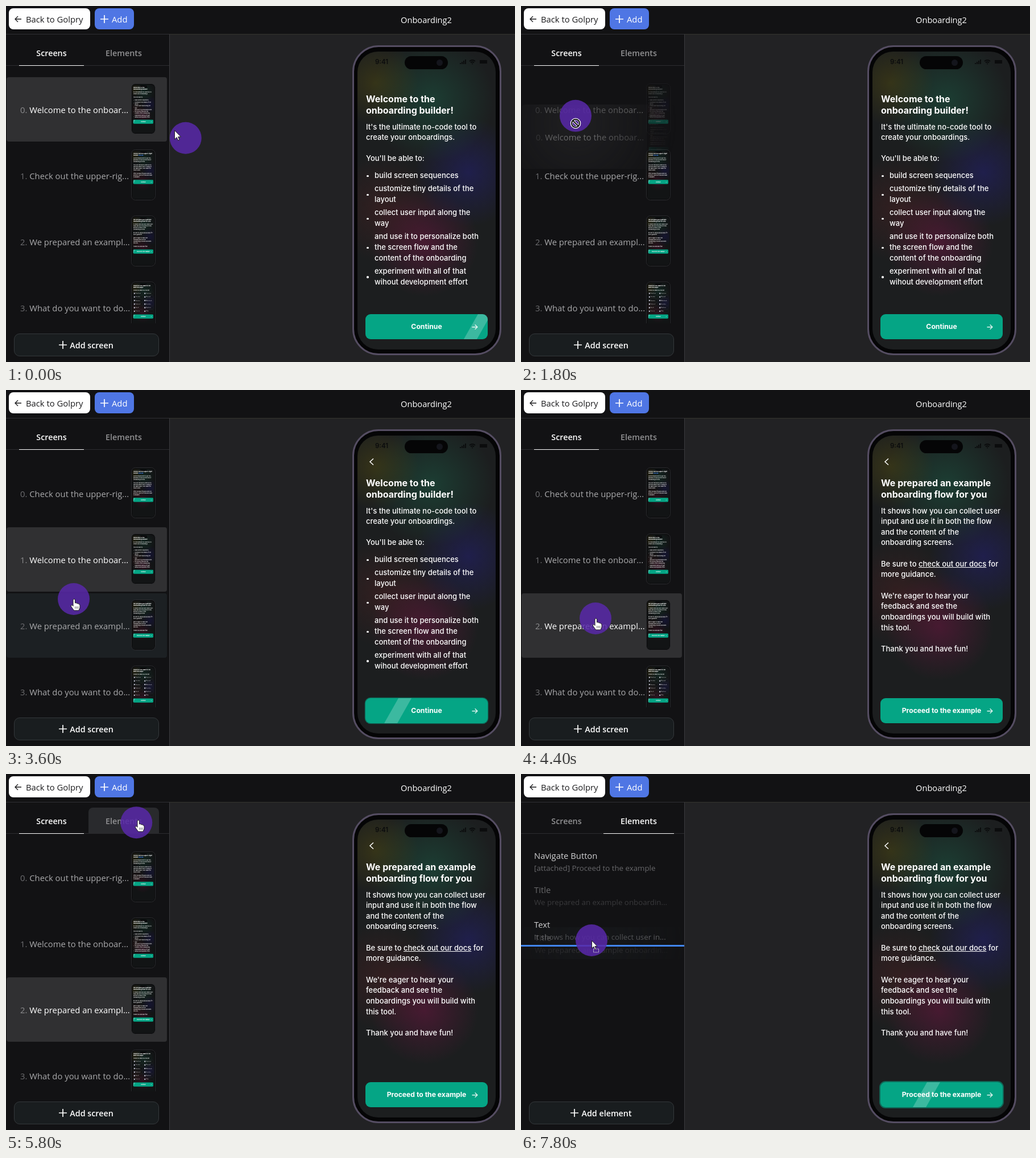
Recreate the animation shown at these times as an HTML page. Size 895 px wide and 625 px high, loop 8000 ms.

```html
<!DOCTYPE html>
<html lang="en">
<head>
<meta charset="utf-8">
<title>Onboarding builder</title>
<style>
html, body { margin: 0; width: 100%; height: 100%; overflow: hidden; background: #121214; }
#stage { position: relative; width: 895px; height: 625px; overflow: hidden; background: #121214;
  font: 14.8px/20px "Open Sans", "Noto Sans", sans-serif; color: #fff; white-space: pre; }
#stage div, #stage svg { position: absolute; box-sizing: border-box; }
svg { overflow: visible; fill: none; stroke: currentColor; }
#canvas { left: 287px; top: 49px; width: 608px; height: 576px; background: #222224;
  border-left: 1px solid #3a3a3d; border-top: 1px solid #34342f; }
#header { left: 0; top: 49px; width: 287px; height: 1px; background: #303033; }
.btn { height: 37px; top: 4px; border-radius: 8px; line-height: 38px; }
#back { left: 5px; width: 143px; background: #fff; color: #1b1b1d; padding-left: 30px; }
#add { left: 156px; width: 69px; background: #4f76e4; padding-left: 30px; }
#name { left: 639px; width: 200px; top: 14px; text-align: center; font-size: 14.6px; }
.tab { top: 59px; height: 46px; line-height: 47px; text-align: center; font-weight: 600; font-size: 14.3px;
  color: #919193; border-radius: 8px 8px 0 0; }
.tab.hover { background: #292a2d; }
.tab.on { color: #fff; border-bottom: 1px solid #fff; border-radius: 0; }
#tabline { left: 0; top: 104px; width: 287px; height: 1px; background: #2d2d30; }
#list { left: 0; top: 0; width: 287px; height: 557px; overflow: hidden; }
#elements { left: 0; top: 0; }
.row { left: 1px; width: 282px; height: 113px; border-radius: 4px; color: #a9a9ab; }
.row .label { left: 24px; top: 47px; }
.row i { font-style: normal; color: #6d6d70; }
.hover { background: #1c2023; }
.row.sel { background: #303032; color: #fff; }
.row.sel i { color: #8c8c8e; }
.row.drag { background: none; opacity: .35; }
.item { left: 1px; width: 281px; height: 56px; border-radius: 4px; color: #d0d0d2; }
.item div { left: 22px; top: 8px; }
.item .sub { top: 30px; font-size: 13.3px; color: #67676a; }
.item.drag { background: none; opacity: .45; }
#bottom { left: 14px; top: 575px; width: 255px; height: 40px; border-radius: 10px; background: #191d1f;
  border: 1px solid #34383b; text-align: center; font-weight: 600; font-size: 14.3px; line-height: 40px; padding-left: 18px; }
#drop { left: 0; width: 287px; height: 3px; background: #4286f5; }
#ghost { left: 0; top: 0; }
#halo { left: -28px; top: -28px; width: 56px; height: 56px; border-radius: 50%; background: rgba(88,40,168,.86); }

.phone { left: 609px; top: 69px; width: 262px; height: 544px; border-radius: 46px; background: #050506;
  border: 3px solid #554d62; font: 500 13px/18.65px Inter, "Noto Sans", sans-serif; color: #fff; }
.phone .glass { left: 6px; top: 8px; width: 243px; height: 523px; border-radius: 36px; overflow: hidden; background:
  radial-gradient(circle 75px at 32px 55px, rgba(88,80,14,.42), transparent),
  radial-gradient(circle 110px at 130px 85px, rgba(28,98,74,.46), transparent),
  radial-gradient(circle 95px at 195px 212px, rgba(36,32,130,.45), transparent),
  radial-gradient(circle 95px at 118px 335px, rgba(130,20,74,.42), transparent),
  radial-gradient(circle 95px at 45px 275px, rgba(84,32,34,.4), transparent), #1c1e1f; }
.island { left: 89px; top: 16px; width: 76px; height: 23px; border-radius: 12px; background: #050506; }
.lens { right: 9px; top: 6px; width: 11px; height: 11px; border-radius: 50%; background: #14151c; }
.clock { left: 37px; top: 17px; color: #0b0c0d; font-weight: 600; font-size: 11.5px; }
.status { left: 186px; top: 21px; color: #0b0c0d; }
.content { left: 21px; top: 81px; width: 216px; }
#stage .content > div, #stage .grid { position: relative; }
.content .title { font-weight: 700; font-size: 16px; line-height: 20px; margin-bottom: 9.5px; }
.content ul { margin: 1px 0 -4.7px; padding: 10px 0 0; list-style: none; }
.content li { position: relative; padding-left: 15px; margin-bottom: 4.7px; }
.content li::before { content: ""; position: absolute; left: 1px; top: calc(50% - .5px); width: 3.5px; height: 3.5px; border-radius: 50%; background: #fff; }
.grid { display: grid; grid-template-columns: 1fr 1fr; gap: 7px 8px; height: 222px; margin-top: 9px; }
.grid span { border: 1px solid #44474a; border-radius: 8px; padding: 5px 4px 0 24px; font-size: 10px; position: relative; overflow: hidden; }
.grid span::before { content: ""; position: absolute; left: 4px; top: 8px; width: 14px; height: 14px; border-radius: 50%; background: #dde; }
.content b { color: #3c7df0; }
#cta { left: 20px; top: 469px; }
.cta { left: 0; top: 0; width: 215px; height: 44px; border-radius: 9px; background: #05a585;
  text-align: center; line-height: 43px; font-weight: 700; font-size: 12.2px; overflow: hidden; }
.cta .arrow { right: 16px; top: 0; font-weight: 500; font-size: 14px; }
.cta .shine { top: 0; left: -24px; width: 48px; height: 44px; background: rgba(255,255,255,.22);
  clip-path: polygon(52% 0, 100% 0, 48% 100%, 0 100%); }
#stage .thumb { left: 219px; top: 11px; transform: scale(.1636); transform-origin: 0 0; border-color: #2f3033; border-width: 6px; }
.thumb .glass { left: 3px; top: 6px; opacity: .6; }
.thumb .content { left: 18px; top: 27px; }
#stage .thumb .cta { left: -1px; margin-top: 20px; }
</style>
</head>
<body>
<div id="stage">
  <div id="canvas"></div><div id="header"></div>
  <div id="back" class="btn"><svg style="left:10px;top:13px" width="12" height="12" stroke-width="1.3"><path d="M12 6H1M6 1L1 6L6 11"/></svg>Back to Golpry</div>
  <div id="add" class="btn"><svg style="left:10px;top:12px" width="14" height="14" stroke-width="1.7"><path d="M7 0V14M0 7H14"/></svg>Add</div>
  <div id="name">Onboarding2</div>
  <div id="tabline"></div>
  <div class="tab" style="left:23px;width:114px">Screens</div>
  <div class="tab" style="left:145px;width:124px">Elements</div>
  <div id="list"></div>
  <div id="elements"></div>
  <div id="bottom"><svg style="top:12px" width="14" height="14" stroke-width="1.7"><path d="M7 0V14M0 7H14"/></svg><span></span></div>
  <div id="phone"></div>
  <div id="ghost"></div>
  <div id="drop"></div>
  <div id="halo"></div>
  <svg id="cursor" width="1" height="1" style="left:0;top:0" stroke-linejoin="round">
    <g id="arrow"><path d="M.5 .5V16L4.2 12.6L6.7 18L9 17L6.6 11.8H11.5Z" fill="#fff" stroke="#222"/></g>
    <g id="hand"><path d="M-1 10V2Q-1 0 .7 0T2.5 2V7Q5 6 6 8Q8.3 7.2 9.2 9Q11 9 11 11.3V15L9 20H0.5L-4.5 13Q-5 10.5 -3 10.5L-1 12.5Z" fill="#fff" stroke="#222"/><path d="M2.8 13V17M5.3 13V17M7.8 13V17" stroke="#444" stroke-width=".8"/></g>
    <g id="deny"><circle r="7.3" stroke="#fff" stroke-width="4"/><path d="M-5 -5L5 5" stroke="#fff" stroke-width="4"/><circle r="7" stroke="#111" stroke-width="2"/><path d="M-5 -5L5 5" stroke="#111" stroke-width="2"/></g>
    <g id="move"><path d="M.5 .5V14L3.7 11L6 16L8 15L5.8 10.5H10Z" fill="#fff" stroke="#222"/><rect x="3.5" y="15" width="9" height="6" stroke="#ddd" stroke-dasharray="1.5 1"/></g>
  </svg>
</div>
<script>
const LOOP = 8000, STEP = 200, SHINE = 1400, LAG = 55;
const DROPPED = 3000, OPENED = 4400, ELEMENTS = 6000;
const $ = id => document.getElementById(id);

function make(parent, cls, html = '') {
  const el = document.createElement('div');
  el.className = cls;
  el.innerHTML = html;
  parent.append(el);
  return el;
}

const bullets = ['build screen sequences', 'customize tiny details of the\nlayout', 'collect user input along the\nway',
  'and use it to personalize both\nthe screen flow and the\ncontent of the onboarding',
  'experiment with all of that\nwihout development effort'];
const topics = ['Grow faster', 'Learn more', 'Test ideas', 'Plan work', 'Save time', 'Make friends',
  'Find a tool', 'Get advice', 'Stay fit', 'Read more', 'Try it out', 'Other'];
const screens = [
  { label: 'Welcome to the onboar...', title: 'Welcome to the\nonboarding builder!', button: 'Continue',
    body: "It's the ultimate no-code tool to\ncreate your onboardings.\n\nYou'll be able to:<ul>" +
      bullets.map(b => `<li>${b}</li>`).join('') + '</ul>' },
  { label: 'Check out the upper-rig...', title: 'Check out the upper-right\ncorner <b>● ● ●</b>', button: 'Continue',
    body: 'Use the menu there to see the\npreview of your current flow of\nonboarding screens.\n\n' +
      'You can edit each screen on its\nown and watch every change in\nthe same place, then share the\nresult easily.\n\n' +
      'After you have finished with the\nscreens, save the flow and make\nit available.' },
  { label: 'We prepared an exampl...', title: 'We prepared an example\nonboarding flow for you', button: 'Proceed to the example',
    body: 'It shows how you can collect user\ninput and use it in both the flow\nand the content of the\nonboarding screens.\n\n' +
      'Be sure to <u>check out our docs</u> for\nmore guidance.\n\n' +
      "We're eager to hear your\nfeedback and see the\nonboardings you will build with\nthis tool.\n\nThank you and have fun!" },
  { label: 'What do you want to do...', title: 'What do you want to do\nwith this app?', button: 'Continue',
    body: 'Choose as many as you like<div class="grid">' + topics.map(s => `<span>${s}</span>`).join('') + '</div>' }
];

const content = s => `<div class="title">${s.title}</div><div>${s.body}</div>`;
const cta = s => `<div class="cta"><div class="shine"></div>${s.button}<div class="arrow">→</div></div>`;
const island = '<div class="island"><div class="lens"></div></div>';
const statusIcons = '<svg class="status" width="50" height="10"><path d="M1 9V7M4 9V5M7 9V3M10 9V1" stroke-width="2"/>' +
  '<path d="M17 4Q22 0 27 4M19 6.5Q22 4 25 6.5M21 8.5H23" stroke-width="1.7"/><path d="M35 5H48" stroke-width="6"/></svg>';

const phone = $('phone');
phone.className = 'phone';
phone.innerHTML = `<div class="glass"></div>${island}<div class="clock">9:41</div>${statusIcons}
<svg id="chevron" style="left:27px;top:48px" width="8" height="12" stroke-width="1.5"><path d="M7 .5L1 6L7 11.5"/></svg>
<div class="content"></div><div id="cta"></div>`;

const rows = screens.map(s => make($('list'), 'row',
  `<div class="label"><i></i>${s.label}</div><div class="phone thumb"><div class="glass"></div>${island}` +
  `<div class="content">${content(s)}${cta(s)}</div></div>`));
const items = [['Navigate Button', '[attached] Proceed to the example'],
  ['Title', 'We prepared an example onboardin...'], ['Text', 'It shows how you can collect user in...']]
  .map(([name, sub], i) => {
    const el = make($('elements'), 'item', `<div>${name}</div><div class="sub">${sub}</div>`);
    el.style.top = 125 + 60.3 * i + 'px';
    return el;
  });
const tabs = document.querySelectorAll('.tab');

function ghostOf(el, cls, top, x, y) {
  const copy = el.cloneNode(true);
  copy.className = cls;
  copy.style.top = top + 'px';
  copy.style.maskImage = copy.style.webkitMaskImage =
    `radial-gradient(circle 175px at ${x}px ${y}px, rgba(0,0,0,.45), transparent)`;
  $('ghost').append(copy);
  return copy;
}
rows[0].querySelector('i').textContent = '0. ';
const drags = [
  { from: 1400, to: DROPPED, valid: 2200, y: 158, line: 354, source: rows[0], ghost: ghostOf(rows[0], 'row sel', 125, 96, 33) },
  { from: 7400, to: LOOP, valid: 7800, y: 208, line: 300, source: items[1], ghost: ghostOf(items[1], 'item hover', 185.3, 124, 24) }
];

// time, x, y of the pointer
const path = [[-100, 332, 243], [0, 296, 218], [400, 190, 184], [800, 110, 161], [1200, 96, 158], [1600, 96, 158], [1800, 96, 206],
  [2400, 104, 310], [2800, 112, 340], [3400, 119, 367], [3600, 119, 367], [4200, 131, 401], [5200, 131, 401], [5600, 222, 96],
  [5800, 232, 81], [6200, 232, 81], [6800, 124, 209], [7400, 124, 209], [7700, 124, 292], [8000, 124, 292]];
function pointer(t) {
  const i = Math.max(1, path.findIndex(p => p[0] >= t));
  const [a, b] = [path[i - 1], path[i]], k = (t - a[0]) / (b[0] - a[0]);
  return [a[1] + (b[1] - a[1]) * k, a[2] + (b[2] - a[2]) * k];
}
const show = (el, on) => { el.style.display = on ? '' : 'none'; };
const move = (el, x, y) => { el.style.transform = `translate(${x}px,${y}px)`; };

let shown = -1;
function showScreen(n) {
  if (n === shown) return;
  shown = n;
  phone.querySelector(':scope > .content').innerHTML = content(screens[n]);
  $('cta').innerHTML = cta(screens[n]);
}

function drawButton(t) {
  const offset = t < DROPPED ? 552 : t < OPENED ? 486 : 600;
  const phase = (t + offset) % SHINE;
  const beat = phase > SHINE / 2 + 55 ? phase - SHINE : phase;
  const x = 713 + .21 * beat, swell = Math.max(0, Math.cos(beat / SHINE * 2 * Math.PI)) ** 3;
  const button = $('cta').firstChild, shine = button.firstChild;
  show(shine, x > 625);
  move(shine, x - 632, 0);
  button.style.boxShadow = `0 0 0 ${2 * swell}px rgba(5,165,133,.55)`;
}

function draw(t) {
  const [x, y] = pointer(t), drag = drags.find(d => t >= d.from && t < d.to);
  const onElements = t >= ELEMENTS, order = t < DROPPED ? [0, 1, 2, 3] : [1, 0, 2, 3];
  const selected = t < OPENED ? 0 : 2;
  const inside = (top, height) => !drag && x < 282 && y >= top && y < top + height;

  show($('list'), !onElements);
  show($('elements'), onElements);
  $('bottom').lastChild.textContent = onElements ? 'Add element' : 'Add screen';
  $('bottom').firstChild.style.left = (onElements ? 72 : 78) + 'px';
  const tabHover = x > 145 && x < 269 && y > 59 && y < 104;
  tabs[0].className = onElements ? 'tab' : 'tab on';
  tabs[1].className = onElements ? 'tab on' : tabHover ? 'tab hover' : 'tab';

  let overItem = tabHover;
  order.forEach((n, i) => {
    const row = rows[n], top = 125 + 116 * i, hover = inside(top, 113);
    overItem ||= hover && !onElements;
    row.style.top = top + 'px';
    row.querySelector('i').textContent = i + '. ';
    row.className = 'row' + (n === selected ? ' sel' : hover ? ' hover' : '') + (drag?.source === row ? ' drag' : '');
  });
  items.forEach((item, i) => {
    const hover = inside(125 + 60.3 * i, 56);
    overItem ||= hover && onElements;
    item.className = 'item' + (hover ? ' hover' : '') + (drag?.source === item ? ' drag' : '');
  });

  for (const d of drags) {
    show(d.ghost, d === drag);
    move(d.ghost, 1, y - d.y);
  }
  const valid = drag && t >= drag.valid;
  show($('drop'), valid);
  if (valid) $('drop').style.top = drag.line + 'px';

  const shape = drag ? (valid ? 'move' : 'deny') : overItem ? 'hand' : 'arrow';
  for (const id of ['arrow', 'hand', 'deny', 'move']) show($(id), id === shape);
  move($('cursor'), x, y);
  move($('halo'), ...pointer(t - LAG));

  showScreen(selected);
  show($('chevron'), t >= DROPPED);
  drawButton(t);
}

const start = performance.now();
function tick() {
  const t = (performance.now() - start) % LOOP;
  draw(Math.floor(t / STEP) * STEP);
  requestAnimationFrame(tick);
}
tick();
</script>
</body>
</html>
```
